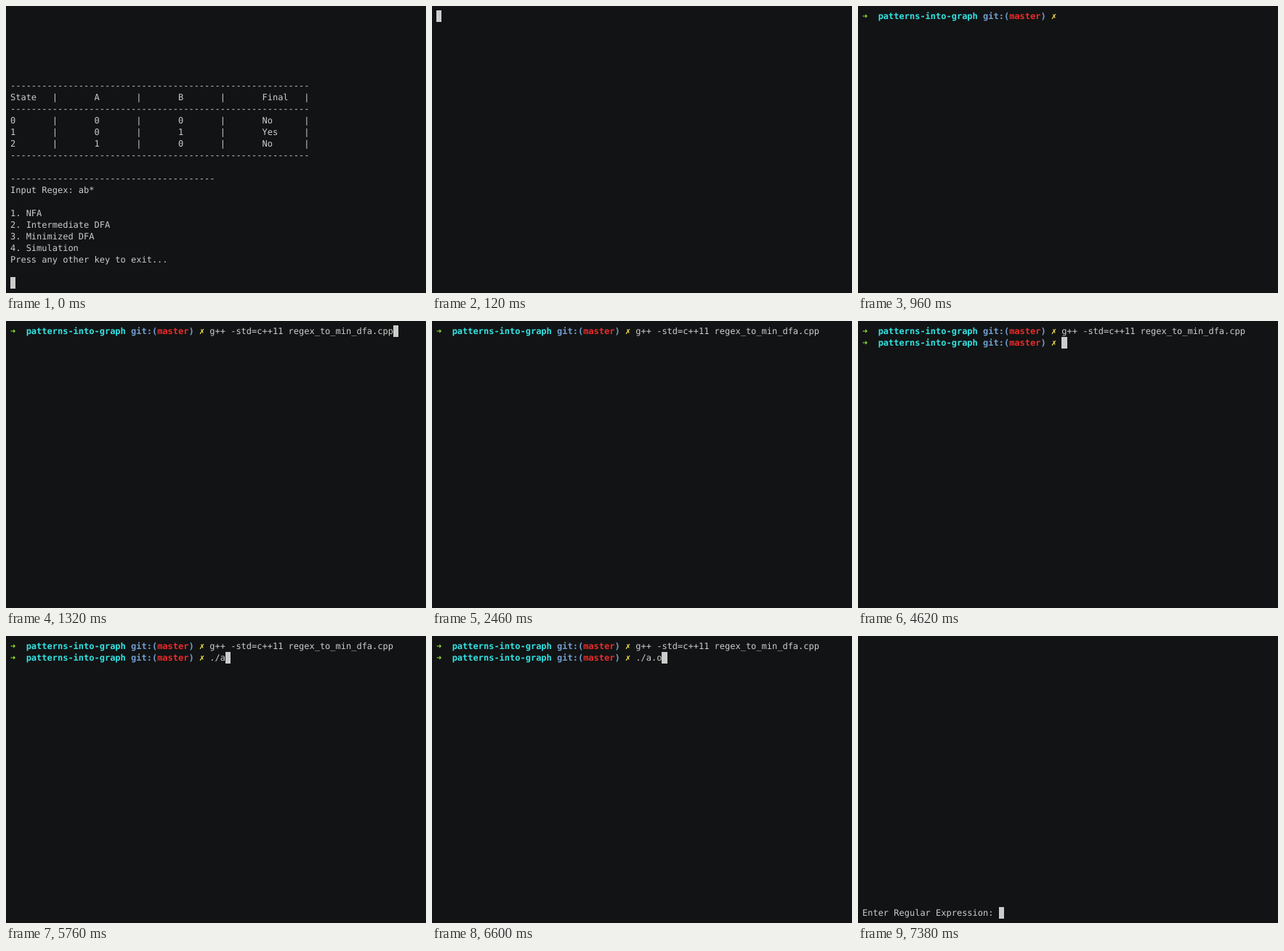
Animation of 578 by 396 pixels, one loop 8 s. Source, as an HTML page:

```html
<!DOCTYPE html>
<html lang="en">
<head>
<meta charset="utf-8">
<title>Terminal</title>
<style>
  html, body { margin: 0; width: 100%; height: 100%; overflow: hidden; background: #121314; }
  #stage { position: relative; width: 578px; height: 396px; overflow: hidden; }
  #text {
    position: absolute; left: 6px; top: 6px; margin: 0;
    font: 12px/16px "DejaVu Sans Mono", monospace;
    font-variant-ligatures: none;
    letter-spacing: -0.006px; /* advance on a 1/64 px grid */
    text-rendering: geometricPrecision;
    color: #cccccc; white-space: pre;
  }
  #cursor { position: absolute; height: 16px; background: #cccccc; }
  .green { color: #8ae234; }
  .cyan { color: #34e2e2; }
  .blue { color: #729fcf; }
  .red { color: #ef2929; }
  .yellow { color: #fce94f; }
</style>
</head>
<body>
<div id="stage"><div id="cursor"></div><pre id="text"></pre></div>
<script>
const LOOP = 8000, CHAR = 462 / 64, ROW = 16, PAD = 6;
const textEl = document.getElementById('text');
const cursorEl = document.getElementById('cursor');

const paint = (color, s) => `<b class="${color}">${s}</b>`;
const prompt = paint('green', '➜') + '  ' + paint('cyan', 'patterns-into-graph') + ' ' +
  paint('blue', 'git:(') + paint('red', 'master') + paint('blue', ')') + ' ' + paint('yellow', '✗') + ' ';
const PROMPT_COLS = 38;

const rule = '-'.repeat(57);
const tableRow = (first, ...rest) =>
  first.padEnd(8) + rest.map(c => '|       ' + c.padEnd(8)).join('') + '|';

const menu = '\n'.repeat(6) + [
  rule,
  tableRow('State', 'A', 'B', 'Final'),
  rule,
  tableRow('0', '0', '0', 'No'),
  tableRow('1', '0', '1', 'Yes'),
  tableRow('2', '1', '0', 'No'),
  rule,
  '',
  '-'.repeat(39),
  'Input Regex: ab*',
  '',
  '1. NFA',
  '2. Intermediate DFA',
  '3. Minimized DFA',
  '4. Simulation',
  'Press any other key to exit...'
].join('\n');

const build = 'g++ -std=c++11 regex_to_min_dfa.cpp';
const run = './a.out';
const ask = 'Enter Regular Expression: ';
const built = prompt + build;
const typed = n => [built + '\n' + prompt + run.slice(0, n), 1, PROMPT_COLS + n];

// start time, text, cursor row, cursor column (no row: cursor hidden)
const steps = [
  [0, menu, 23, 0],
  [120, '', 0, 0],
  [180, prompt, 0, PROMPT_COLS],
  [960, prompt],
  [1260, built, 0, PROMPT_COLS + build.length],
  [1680, built, 1, 0],
  [2460, built],
  [3240, built, 1, 0],
  [4020, built],
  [4620, ...typed(0)],
  [5160, ...typed(1)],
  [5280, ...typed(2)],
  [5760, ...typed(3)],
  [6060, ...typed(4)],
  [6600, ...typed(5)],
  [6780, ...typed(6)],
  [6900, ...typed(7)],
  [7320, built + '\n' + prompt + run, 2, 0],
  [7380, '\n'.repeat(23) + ask, 23, ask.length]
];

const cellX = col => Math.round(PAD + col * CHAR);
let shown = null;

function show(step) {
  const [, text, row, col] = step;
  textEl.innerHTML = text;
  cursorEl.hidden = row === undefined;
  if (cursorEl.hidden) return;
  cursorEl.style.left = cellX(col) + 'px';
  cursorEl.style.width = cellX(col + 1) - cellX(col) + 'px';
  cursorEl.style.top = PAD + row * ROW + 'px';
}

function tick() {
  const t = performance.now() % LOOP;
  const step = steps.findLast(s => s[0] <= t);
  if (step !== shown) show(shown = step);
  requestAnimationFrame(tick);
}
tick();
</script>
</body>
</html>
```
